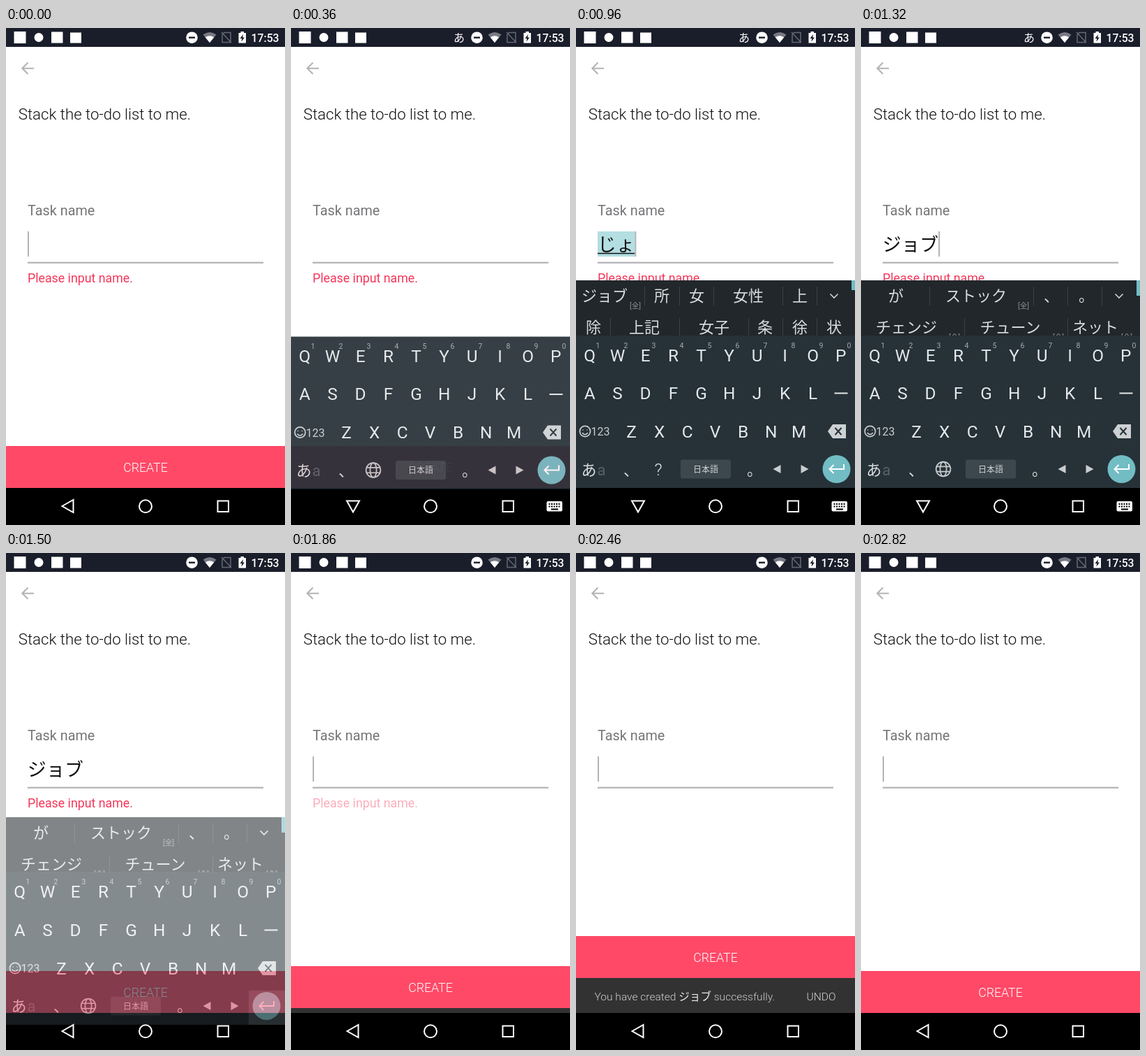
Write an HTML page that moves like this. It is 400x711 px and loops after 2.88 s.

```html
<!DOCTYPE html>
<html lang="ja">
<head>
<meta charset="utf-8">
<title>To-do</title>
<style>
html, body { margin: 0; width: 100%; height: 100%; overflow: hidden; background: #fff; }
svg { display: block; width: 400px; height: 711px; font-family: Roboto, "Noto Sans CJK JP", "Noto Sans CJK", sans-serif; }
.mid { text-anchor: middle; }
.light { font-weight: 300; }
.line { fill: none; stroke: #fff; stroke-width: 2; }
.key { font-size: 24.4px; fill: #e4e8ea; }
.hint { font-size: 10.5px; fill: #a3abaf; }
.cand { font-size: 22px; fill: #dadcdd; }
.tag { font-size: 10.5px; fill: #8d9295; }
.sep { stroke: #3b4144; }
.soft { fill: none; stroke: #c9cdcf; stroke-width: 1.7; }
</style>
</head>
<body>
<svg viewBox="0 0 400 711">
  <rect width="400" height="711" fill="#fff"/>

  <path d="M40 57.7H24M31.4 49.6L23.3 57.7l8.1 8.1" fill="none" stroke="#b4b4b6" stroke-width="2.1"/>
  <text class="light" x="17.8" y="130.7" font-size="22.22" fill="#111">Stack the to-do list to me.</text>
  <text x="31.1" y="267.6" font-size="19.8" fill="#757578">Task name</text>
  <rect x="31" y="334.6" width="338" height="2.2" fill="#b1b1b7"/>
  <text id="error" x="31" y="363.9" font-size="17.78" fill="#f5365a">Please input name.</text>

  <g id="mark">
    <rect x="31" y="291" width="54" height="36" fill="#b3dee2"/>
    <path id="markLine" stroke="#111" stroke-width="1.6"/>
  </g>
  <text id="input" x="31" y="319" font-size="26.67" fill="#111"></text>
  <rect id="cursor" y="291" width="2" height="36" fill="#b3b3b8"/>

  <g id="footer">
    <rect y="598" width="400" height="60" fill="#ff4967"/>
    <text class="mid light" x="200" y="634.6" font-size="17.78" fill="#fff">CREATE</text>
    <rect y="658" width="400" height="50" fill="#323232"/>
    <text class="light" x="26.5" y="690" font-size="15.56" fill="#cfcfcf">You have created <tspan font-weight="400" fill="#eee">ジョブ</tspan> successfully.</text>
    <text class="light" x="330.5" y="690" font-size="15.56" fill="#d4d4d4">UNDO</text>
  </g>

  <rect y="658" width="400" height="53" fill="#000"/>

  <g id="keyboard">
    <g id="wordPanel"></g>
    <g id="nextPanel"></g>
    <rect y="440" width="400" height="218" fill="#263138"/>
    <g id="keys"></g>

    <circle class="soft" cx="13" cy="577" r="7.6"/>
    <path class="soft" d="M9 579q4 5 8 0M10 574.5v1M16 574.5v1"/>
    <text x="21.5" y="583" font-size="16" fill="#c9cdcf">123</text>
    <path d="M361 577l7-10h19v20h-19z" fill="#cdd1d3"/>
    <path d="M371.5 572l9 10m0-10l-9 10" stroke="#263138" stroke-width="2"/>

    <text x="7.5" y="639.5" font-size="22" fill="#d9dddf">あ<tspan fill="#566168" dx="1">a</tspan></text>
    <text class="mid key light" id="question" x="118" y="639.5">?</text>
    <g id="globe" class="soft">
      <circle cx="118" cy="631" r="10.4"/>
      <ellipse cx="118" cy="631" rx="4.6" ry="10.4"/>
      <path d="M108.5 627.3h19M108.5 634.7h19"/>
    </g>
    <rect x="150" y="617.5" width="72" height="27" rx="3" fill="#3d484e"/>
    <text class="mid" x="186" y="635.6" font-size="12" fill="#cfd3d5">日本語</text>
    <path d="M282.5 631l11-6v12zM333.5 631l-11-6v12z" fill="#c9cdcf"/>
    <circle cx="373.5" cy="631" r="20" fill="#72bcc4"/>
    <path class="line" d="M384 624v7h-20M369.5 625l-6 6 6 6"/>
    <rect id="press" x="348" y="609" width="52" height="49" fill="#fff" opacity=".15"/>
  </g>

  <path id="back" class="line" d="M80.5 684l16-9v18z"/>
  <circle class="line" cx="200" cy="684.3" r="9"/>
  <rect class="line" x="303.5" y="676.5" width="15.5" height="15.5"/>
  <g id="switcher">
    <rect x="366.5" y="677" width="22.5" height="14.5" rx="2" fill="#fff"/>
    <path d="M369.5 681h17M369.5 684.5h17" stroke="#000" stroke-width="2" stroke-dasharray="2 1.5"/>
    <path d="M373 688.5h10" stroke="#000" stroke-width="2"/>
  </g>

  <rect width="400" height="27" fill="#1a1d2a"/>
  <g fill="#fff">
    <rect x="11.5" y="5" width="17" height="17"/>
    <circle cx="47" cy="13.5" r="6.5"/>
    <rect x="65" y="5.5" width="16.5" height="16"/>
    <rect x="92" y="6.5" width="16" height="15"/>
    <text id="ime" class="mid" x="241" y="19.5" font-size="16">あ</text>
    <circle cx="266.5" cy="13.7" r="8.3"/>
    <path d="M262 13.7h9" stroke="#1a1d2a" stroke-width="2.4"/>
    <path d="M282.5 9.5q9.5-7 19 0L292 21z" fill="#777a83"/>
    <path d="M285.7 13.3q6.3-4.3 12.6 0L292 21z"/>
    <path d="M313 6.5h9v14h-12v-11zM309 6l14 15" fill="none" stroke="#666973" stroke-width="1.5"/>
    <path d="M333.5 7h3v-2h4.5v2h3v14.5h-10.5z"/>
    <path d="M340 9l-4.5 6h2.7l-.7 4.5 4.5-6h-2.7z" fill="#1a1d2a"/>
    <text x="351.5" y="19.5" font-size="15.8" font-weight="500">17:53</text>
  </g>
</svg>
<script>
const LOOP = 2880, STEP = 60, FULL_WIDTH = 26.67;
const $ = id => document.getElementById(id);

function add(parent, tag, attrs, text = "") {
  const el = document.createElementNS("http://www.w3.org/2000/svg", tag);
  for (const name in attrs) el.setAttribute(name, attrs[name]);
  el.textContent = text;
  parent.append(el);
}
const label = (parent, cls, x, y, text) => add(parent, "text", { class: "mid " + cls, x, y }, text);

// Keys
function keyRow(chars, x, y) {
  [...chars].forEach((c, i) => label($("keys"), "key", x + 40 * i, y, c));
}
keyRow("QWERTYUIOP", 19.6, 476.5);
keyRow("ASDFGHJKL", 19.6, 530.7);
keyRow("ZXCVBNM", 79.6, 585.7);
[..."1234567890"].forEach((c, i) => label($("keys"), "hint", 31.5 + 40 * i, 457.5, c));
add($("keys"), "path", { d: "M370.5 522.5h19", stroke: "#e4e8ea", "stroke-width": 2 });
label($("keys"), "cand", 79, 639.5, "、");
label($("keys"), "cand", 256, 639.5, "。");

// Suggestions: each row lists [text, centre], separators and tag positions
function panel(id, thumb, rows) {
  const g = $(id);
  add(g, "rect", { y: 361, width: 400, height: 79, fill: "#21272a" });
  rows.forEach(({ words, seps, tags }, i) => {
    const y = 391 + 45 * i;
    for (const x of seps) add(g, "path", { class: "sep", d: `M${x + .5} ${y - 21}v27` });
    for (const [text, x] of words) label(g, "cand", x, y, text);
    for (const x of tags) label(g, "tag", x, y + 10, "[全]");
  });
  add(g, "path", { class: "soft", d: "M364.5 380.5l5.5 5.5 5.5-5.5" });
  add(g, "rect", { x: 395, y: 361, width: 5, height: thumb, fill: "#72bcc4" });
}
panel("wordPanel", 14, [
  { words: [["ジョブ", 41], ["所", 123], ["女", 173], ["女性", 247], ["上", 321]], seps: [98, 148, 197, 296, 345], tags: [85] },
  { words: [["除", 25], ["上記", 98], ["女子", 198], ["条", 271], ["徐", 321], ["状", 370]], seps: [49, 148, 247, 296, 345], tags: [] }
]);
panel("nextPanel", 22, [
  { words: [["が", 50], ["ストック", 165], ["、", 273], ["。", 323]], seps: [98, 247, 296, 345], tags: [233] },
  { words: [["チェンジ", 65], ["チューン", 214], ["ネット", 336]], seps: [148, 296], tags: [134, 283, 381] }
]);

// Motion
const ramp = (t, from, to) => Math.min(1, Math.max(0, (t - from) / (to - from)));
const smooth = x => x * x * (3 - 2 * x);
const show = (id, on) => $(id).setAttribute("visibility", on ? "visible" : "hidden");
const within = (t, from, to) => t >= from && t < to;

function typed(t) {
  if (within(t, 660, 780)) return "ｊ";
  if (within(t, 780, 1140)) return "じょ";
  return within(t, 1140, 1820) ? "ジョブ" : "";
}

function draw(t) {
  const text = typed(t), composing = within(t, 660, 1140);
  const width = FULL_WIDTH * text.length;
  $("input").textContent = text;
  show("mark", composing);
  $("mark").firstElementChild.setAttribute("width", width);
  $("markLine").setAttribute("d", `M31 322.5h${width}`);

  const blinkStart = t < 600 ? -160 : t < 1820 ? 840 : 1750;
  $("cursor").setAttribute("x", 31 + width);
  show("cursor", (t - blinkStart + 333) % 333 < 167);

  // Keyboard: decelerates in, accelerates out
  const away = t < 900 ? 1 - ramp(t, 311, 395) : ramp(t, 1459, 1513);
  $("keyboard").setAttribute("transform", `translate(0 ${51 * away ** 4})`);
  $("keyboard").setAttribute("opacity", 1 - away ** 3);
  show("wordPanel", within(t, 780, 1140));
  show("nextPanel", within(t, 1140, 1560));
  show("question", composing);
  show("globe", !composing);
  show("press", within(t, 1440, 1560));

  const open = within(t, 330, 1490);
  show("ime", open);
  show("switcher", open);
  $("back").setAttribute("transform", open ? "rotate(-90 89 684)" : "");

  $("error").setAttribute("opacity", 1 - ramp(t, 1820, 1887));
  const lift = 50 * (smooth(ramp(t, 1840, 1925)) - smooth(ramp(t, 2733, 2815)));
  $("footer").setAttribute("transform", `translate(0 ${-lift})`);
}

const start = performance.now();
function tick() {
  const t = (performance.now() - start + 1) % LOOP;
  draw(Math.floor(t / STEP) * STEP);
  requestAnimationFrame(tick);
}
tick();
</script>
</body>
</html>
```
